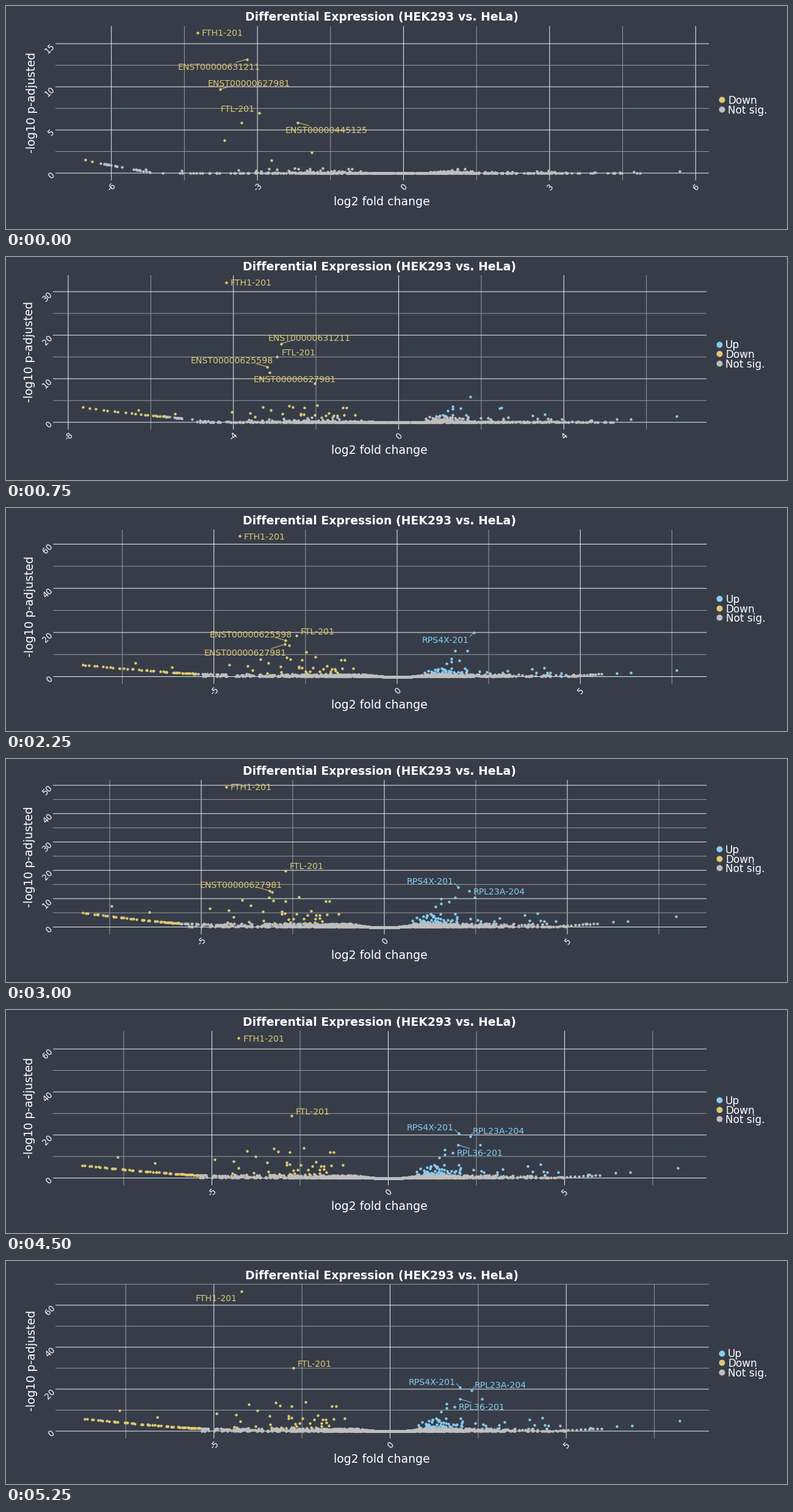
A matplotlib script for the animation above (6 s loop, 1280x367 px).

```python
import numpy as np
import matplotlib.pyplot as plt
from matplotlib.animation import ArtistAnimation

W, H, DPI = 1280, 367, 64
PT = 72 / DPI  # points per pixel
PANEL_W, PANEL_H, BASE = 1070, 253, 241.5
CUT = 1.3  # significance threshold
BG, MAJOR, MINOR = "#363d49", "#f0f0f0", "#999ca2"
COLOR = {"Up": "#87ccef", "Down": "#dfc96f", "Not sig.": "#bebebe"}

plt.rcParams["font.family"] = "DejaVu Sans"
fig = plt.figure(figsize=(W / DPI, H / DPI), dpi=DPI, facecolor=BG)
ax = fig.add_axes([0, 0, 1, 1])
ax.set(xlim=(-0.5, W - 0.5), ylim=(H - 0.5, -0.5))
ax.axis("off")


class View:
    """Pixel scale of one plot: panel corner, zero position, pixels per unit, tick steps."""

    def __init__(self, left, top, x0, sx, sy, xstep, ystep):
        self.left, self.top, self.x0, self.y0 = left, top, x0, top + BASE
        self.sx, self.sy, self.xstep, self.ystep = sx, sy, xstep, ystep

    def px(self, lfc, p):
        return self.x0 + lfc * self.sx, self.y0 - p * self.sy


def text(x, y, s, size, color="white", ha="center", **kw):
    return ax.text(x, y, s, size=size * PT, color=color, ha=ha,
                   va="center_baseline", rotation_mode="anchor", zorder=5, **kw)


def line(xs, ys, color, z=1):
    return ax.plot(xs, ys, color=color, lw=PT, zorder=z, snap=False)[0]


def dots(x, y, kind, size=4.4, z=3):
    return ax.scatter(x, y, s=(size * PT) ** 2, c=COLOR[kind], lw=0, zorder=z)


def axes_parts(v):
    """Grid, tick labels and titles."""
    right, bottom = v.left + PANEL_W, v.top + PANEL_H
    out = []
    for k in range(-8, 9):
        x = v.x0 + k * v.xstep / 2 * v.sx
        if v.left <= x <= right:
            out.append(line([x, x], [v.top, bottom], MINOR if k % 2 else MAJOR))
            if k % 2 == 0:
                out.append(text(x, v.top + 264, f"{k // 2 * v.xstep}", 13.5, rotation=45))
    for k in range(12):
        y = v.y0 - k * v.ystep / 2 * v.sy
        if y < v.top - 1:
            break
        out.append(line([v.left, right], [y, y], MINOR if k % 2 else MAJOR))
        if k % 2 == 0:
            s = f"{k // 2 * v.ystep}"
            dx, dy = (8, 3.5) if len(s) == 1 else (10.5, 7)
            out.append(text(v.left - dx, y + dy, s, 13.5, rotation=45))
    mid = v.left + 534
    out.append(text(mid, v.top - 16.5, "Differential Expression (HEK293 vs. HeLa)", 18.9,
                    weight="bold"))
    out.append(text(mid, v.top + 286.5, "log2 fold change", 18.9))
    out.append(text(v.left - 40.5, v.top + 125.5, "-log10 p-adjusted", 18.9, rotation=90))
    return out


def legend(v, kinds):
    out = []
    for i, kind in enumerate(kinds):
        y = v.top + 128.7 + 15.7 * (i - (len(kinds) - 1) / 2)
        out.append(dots(v.left + 1091, y, kind, 10))
        out.append(text(v.left + 1101.5, y, kind, 17, ha="left"))
    return out


def gene_labels(v, genes):
    """A gene is (name, lfc, p, label dx, label dy[, leader dx, leader dy])."""
    out = []
    for name, lfc, p, dx, dy, *tip in genes:
        x, y = v.px(lfc, p)
        color = COLOR["Up" if lfc > 0 else "Down"]
        out.append(text(x + dx, y + dy, name, 14.1, color))
        if tip:
            out.append(line([x, x + tip[0]], [y, y + tip[1]], color, 2))
    return out


# Strongest unnamed genes at full depth: (lfc, p)
STRONG = [(-7.68, 9.8), (-6.61, 6.8), (-4.92, 8.5), (-4.38, 7.7), (-4.01, 12.6),
          (-3.77, 9.9), (-3.24, 13.6), (-3.13, 12.3), (-2.79, 12), (-2.4, 14),
          (-1.65, 12), (-1.54, 12), (1.6, 13), (1.82, 11.6), (1.6, 10.9), (1.45, 9.4),
          (3.24, 4.2), (3.96, 5.4), (4.32, 6.4), (6.44, 2.4), (6.86, 2.7), (8.21, 4.8)]


def weak_genes():
    """Clouds of less certain genes on both sides at full depth."""
    rng = np.random.default_rng(11)
    down = np.clip(rng.normal(-2.6, 0.95, 52), -5.6, -0.9)
    up = 0.75 + rng.gamma(2, 0.32, 75)
    far = rng.uniform(2.6, 6.2, 9)
    p_down = 1.2 + 6.5 * rng.random(52) ** 3
    p_up = 0.8 + 5.5 * rng.random(75) ** 1.5 * np.minimum(1, up / 1.3)
    p_far = rng.uniform(1.2, 3, 9)
    return np.column_stack([np.r_[down, up, far], np.r_[p_down, p_up, p_far]])


POPULATION = np.vstack([STRONG, weak_genes()])


def band(rng, n, spread, lo, hi, noise):
    """Genes along the zero line, rising a little away from the middle."""
    lfc = np.r_[rng.normal(0, spread, n), rng.uniform(lo, hi, n // 6)]
    lfc = lfc[(lfc > lo) & (lfc < hi)]
    rise = np.clip((np.abs(lfc) - 0.4) / 0.5, 0, 1)
    return np.column_stack([lfc, noise * rise * rng.random(lfc.size) ** 2])


def tail(rng, far, top, knee, n, drop):
    """Streak on the left that falls to the threshold at the knee and goes on below it."""
    t = np.linspace(0.01, 1, n) ** 1.6
    t[:-1] = np.abs(t[:-1] + rng.normal(0, 0.015, n - 1))
    u = np.sort(rng.random(22))
    lfc = np.r_[knee + (far - knee) * t, knee + 1.3 * u]
    p = np.r_[CUT + 0.03 + (top - CUT) * t ** 1.2, CUT * (1 - drop * u)]
    return np.column_stack([lfc, p])


def climb(end):
    """Slow rise of the last genes on the right."""
    lfc = np.linspace(4.7, end, 12)
    return np.column_stack([lfc, 0.2 + 1.05 * (lfc - 4.7) / (end - 4.7)])


def scene(view, genes, others, depth, stretch, streak, n, spread, span, noise):
    rng = np.random.default_rng(5)
    v = View(*view)
    parts = [band(rng, n, spread, *span, noise),
             tail(rng, *streak, drop=0.45 if noise > 0.5 else 1),
             POPULATION * (stretch, depth),
             [g[1:3] for g in genes], others]
    if noise > 0.5:
        parts.append(climb(6 * stretch))
    lfc, p = np.vstack(parts).T
    sig = p > CUT
    groups = {"Up": sig & (lfc > 0), "Down": sig & (lfc < 0), "Not sig.": ~sig}
    groups = {kind: mask for kind, mask in groups.items() if mask.any()}
    return (axes_parts(v) + legend(v, groups) + gene_labels(v, genes)
            + [dots(*v.px(lfc[m], p[m]), kind) for kind, m in groups.items()])


FTH, FTL, RPS, RPL = "FTH1-201", "FTL-201", "RPS4X-201", "RPL23A-204"
E1, E2, E3, E4 = (f"ENST00000{k}" for k in (631211, 627981, 625598, 445125))
DENSE = dict(n=1000, spread=1.6, span=(-5.4, 5.0), noise=1.22)

scenes = [
    scene((81, 33, 651, 79.8, 14.2, 3, 5),
          [(FTH, -4.23, 16.27, 41, 0), (E1, -3.21, 13.2, -46.5, 11.5, -18, 5),
           (E2, -3.77, 9.72, 47, -10, 18, -5), (FTL, -2.96, 6.97, -35.5, -8),
           (E4, -2.17, 5.85, 47, 11.5, 18, 5)],
          [(-3.33, 5.85), (-3.68, 3.8), (-1.89, 2.36), (-2.71, 1.51)],
          depth=0.04, stretch=0.69, streak=(-6.54, 1.55, -6.4, 2),
          n=430, spread=1.6, span=(-5.0, 4.9), noise=0.02),
    scene((77, 30, 643, 67.7, 7.165, 4, 10),
          [(FTH, -4.18, 32.17, 41, 0), (E1, -2.85, 18.07, 46.5, -10.5, 18, -5),
           (FTL, -2.94, 15.07, 35, -7.5), (E3, -3.18, 12.77, -58, -11, -18.5, -5),
           (E2, -3.12, 11.44, 41, 10.5)],
          [(-3.35, 10.2), (-2.03, 9), (1.74, 5.8), (2.44, 3.2), (2.49, 3.4)],
          depth=0.28, stretch=0.82, streak=(-7.65, 3.4, -5.65, 20),
          n=750, spread=1.9, span=(-4.9, 5.2), noise=0.18),
    scene((77.5, 32.5, 645, 64.9, 4.95, 5, 10),
          [(FTH, -4.3, 45.8, 41, 0), (FTL, -2.75, 17, 35, -7.5),
           (E3, -3.04, 14.5, -57, -10, -18, -5), (E2, -3.07, 12.7, -65, 13, -22, 7)],
          [(-2.95, 12), (2.09, 11)],
          depth=0.45, stretch=0.87, streak=(-8.0, 4.2, -5.5, 32),
          n=850, spread=1.6, span=(-5.2, 5.0), noise=0.6),
    scene((77.5, 35.5, 640.5, 60.05, 3.633, 5, 20),
          [(FTH, -4.3, 63.6, 41, 0), (FTL, -2.75, 18.7, 35, -7.5),
           (E3, -3.04, 16.38, -57, -10, -18, -5), (E2, -3.07, 14.6, -65, 13, -22, 7),
           (RPS, 2.09, 19.96, -46, 11.5, -6, 6.5)],
          [(-2.95, 14.2), (-2.48, 11.1), (1.59, 11.8), (1.92, 11.8)],
          depth=0.63, stretch=0.93, streak=(-8.57, 5.3, -5.5, 45),
          n=900, spread=1.5, span=(-5.4, 5.0), noise=1.1),
    scene((77, 34.5, 619.5, 60, 4.665, 5, 10),
          [(FTH, -4.32, 49.4, 41, -0.5), (FTL, -2.7, 19.9, 35, -8),
           (E2, -3.13, 12.75, -47.5, -11, -19, -5.5),
           (RPS, 2.02, 14.04, -46, -11, -6.5, -7), (RPL, 2.32, 12.75, 49.5, 0.5)],
          [(-3.07, 12.4), (2.46, 10.3), (1.94, 10.3)],
          depth=0.76, stretch=0.97, streak=(-8.24, 5, -5.6, 52), **DENSE),
    scene((80, 32.5, 630.5, 57.8, 3.655, 5, 20),
          [(FTH, -4.28, 63.1, 41, 0), (FTL, -2.76, 27.2, 35, -7.5),
           (RPS, 2.02, 17.8, -46, -11, -6.5, -7),
           (RPL, 2.34, 16.8, 47, -10, 3.5, -6.5), ("CKB-201", 2.64, 13.95, 37.5, 10)],
          [(1.97, 13)],
          depth=0.97, stretch=0.99, streak=(-8.68, 5.8, -5.45, 58), **DENSE),
]

# The last two plots share their genes
FULL = dict(others=[(2.61, 15.3)], depth=1, stretch=1,
            streak=(-8.67, 5.8, -5.4, 62), **DENSE)
UP_GENES = [(RPS, 1.99, 20.8, -46, -10, -6, -6), (RPL, 2.32, 19.25, 46.5, -10, 4, -6.5),
            ("RPL36-201", 1.98, 15.3, 35.5, 12.5, 18.5, 5.5)]
scenes += [
    scene((77, 34.5, 626, 57.8, 3.54, 5, 20),
          [(FTH, -4.24, 65, 41, 0), (FTL, -2.75, 29, 35, -7.5)] + UP_GENES, **FULL),
    scene((81, 38, 629, 57.75, 3.455, 5, 20),
          [(FTH, -4.22, 66.6, -41, 10.5), (FTL, -2.75, 29.96, 35, -8)] + UP_GENES, **FULL),
]

anim = ArtistAnimation(fig, scenes, interval=750, repeat=True, repeat_delay=0)
plt.show()
```
